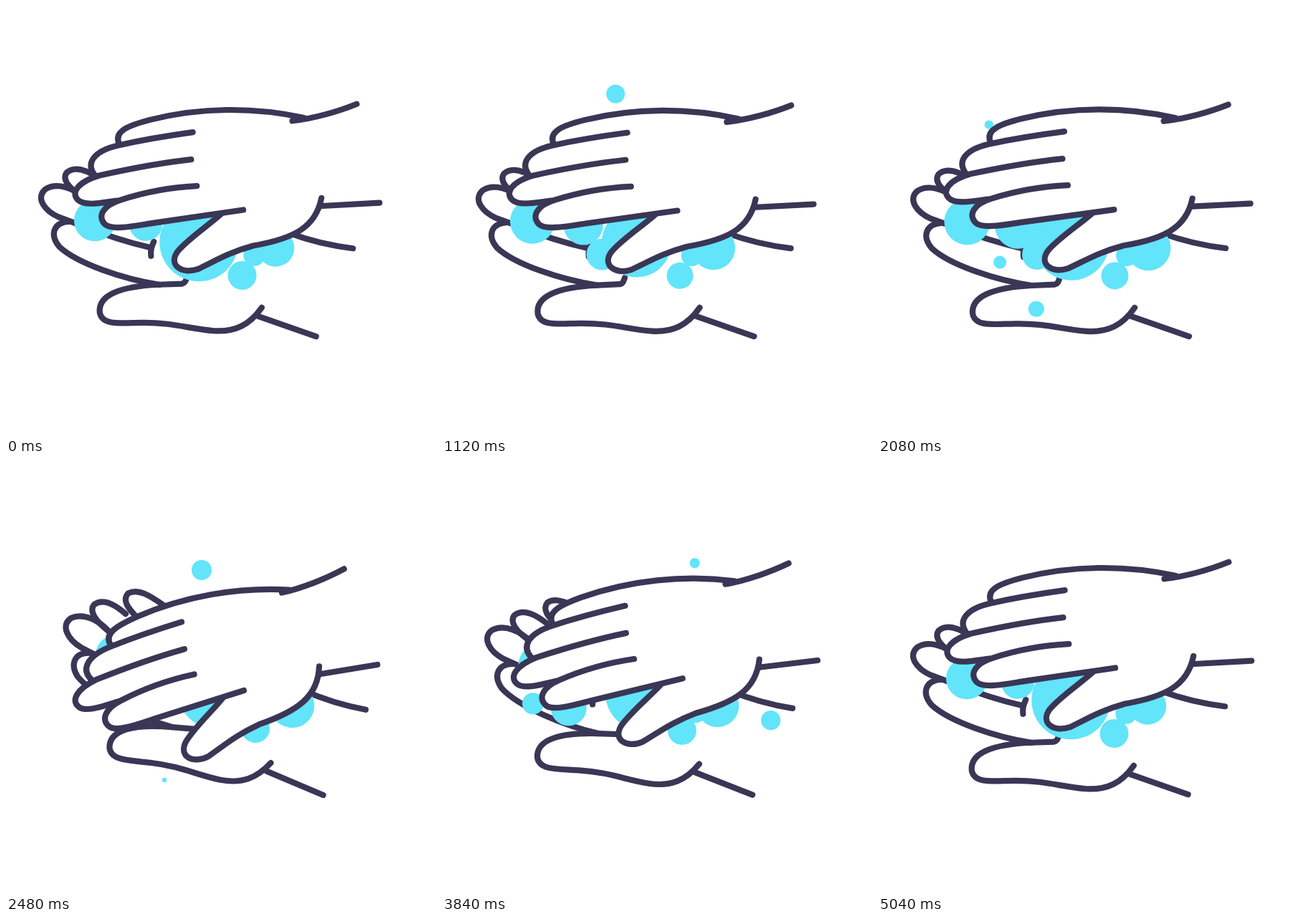
These frames come from a looping animation (600 by 600 pixels, 5.08 s). An HTML page with a canvas:

```html
<!DOCTYPE html>
<html lang="en">
<head>
<meta charset="utf-8">
<title>Washing hands</title>
<style>
  html, body { margin: 0; width: 100%; height: 100%; overflow: hidden; background: #fff; }
  canvas { display: block; width: 100vmin; height: 100vmin; }
</style>
</head>
<body>
<canvas id="stage" width="600" height="600"></canvas>
<script>
const ctx = document.getElementById('stage').getContext('2d');
const LOOP = 5080, STEP = 40, RUB = 1008;
const INK = '#3a3655', FOAM = '#62e4fa';
const paths = (...list) => list.map(d => new Path2D(d));

const lowerHand = paths(
  'M181 220 C162 210 144 201 131 210 C123 221 134 231 146 241',
  'M131 239 C112 226 96 222 86 231 C79 241 90 254 112 267',
  'M112 267 C95 252 72 244 56 254 C42 266 55 284 75 293 L99 302 C114 308 150 324 201 336',
  'M90 299 C66 300 62 318 75 334 C100 358 165 380 214 388',
  'M207 328 C204 335 202 340 203 348',
  'M253 378 C251 384 250 386 246 387 L214 388 C160 390 128 402 131 427 ' +
  'C135 445 160 441 190 441 C235 441 255 450 290 453 C320 455 340 445 357 421'
);
const lowerArm = paths('M352 433 L433 461', 'M395 317 C425 328 450 334 484 338');

const upperFill = new Path2D(
  'M157 193 C150 176 170 168 200 160 C270 142 345 141 415 156 L440 268 ' +
  'C432 310 400 325 345 335 C310 345 295 355 268 368 C245 376 226 362 240 343 ' +
  'C255 325 285 305 300 291 L205 304 C180 308 148 315 138 306 C127 295 135 280 155 274 ' +
  'C140 278 110 282 100 272 C90 262 100 247 126 238 C112 232 115 205 157 193Z'
);
const upperHand = paths(
  'M157 193 C150 176 170 168 200 160 C270 142 345 141 415 156',
  'M260 177 C225 182 190 188 155 196 C122 204 110 221 124 238',
  'M258 215 C215 220 165 230 130 238 C100 247 90 262 100 272 C110 282 138 275 155 273',
  'M266 252 C230 254 190 262 160 272 C135 280 127 295 138 306 C148 315 180 308 205 304 L331 285',
  'M300 291 C285 305 255 325 240 343 C226 362 245 376 268 368 C295 355 310 345 345 335 C400 325 432 310 440 268'
);
const upperArm = paths('M400 160 C430 157 465 147 490 137', 'M441 279 L521 275');

// Foam carried by the lower hand: position and radius at each key time
const foamTimes = [0, 520, 1680, 2480, 3040, 3840, 5040];
const foam = [
  { x: 125, y: 298, r: [29, 27, 35, 29, 31, 29, 29] },
  { x: 196, y: 304, r: [23, 25, 30, 35, 45, 32, 23] },
  { x: 222, y: 345, r: [0, 0, 42, 0, 0, 0, 0] },
  { x: 170, y: 355, r: [0, 0, 0, 18, 26, 25, 0] },
  { x: 270, y: 329, r: [55, 47, 50, 55, 63, 50, 55] },
  { x: 347, y: 348, r: [15, 15, 15, 15, 23, 16, 15] },
  { x: 377, y: 338, r: [26, 29, 32, 31, 33, 30, 26] },
  { x: 330, y: 376, r: [20, 19, 18, 20, 21, 20, 20] }
];

// Loose bubbles: life span, start point, end point, radius
const bubbles = [
  { life: [300, 1780], from: [259, 198], to: [238, 104], r: 13 },
  { life: [1200, 2200], from: [140, 213], to: [155, 165], r: 18 },
  { life: [1450, 2600], from: [220, 348], to: [221, 442], r: 11 },
  { life: [2100, 2900], from: [265, 169], to: [276, 140], r: 14 },
  { life: [2950, 4000], from: [340, 190], to: [353, 137], r: 16 },
  { life: [2960, 4100], from: [344, 387], to: [465, 356], r: 21 },
  { life: [3400, 4500], from: [150, 310], to: [114, 348], r: 15 }
];

const mix = (a, b, k) => a + (b - a) * k;
const wave = (t, peak) => 0.5 + 0.5 * Math.cos(2 * Math.PI * (t / RUB - peak));

function keyed(values, t) {
  let i = 0;
  while (i < foamTimes.length - 2 && t >= foamTimes[i + 1]) i++;
  const k = (t - foamTimes[i]) / (foamTimes[i + 1] - foamTimes[i]);
  return mix(values[i], values[i + 1], k * k * (3 - 2 * k));
}

function dot(x, y, r) {
  if (r <= 0) return;
  ctx.beginPath();
  ctx.arc(x, y, r, 0, 2 * Math.PI);
  ctx.fill();
}

// Runs draw with the pivot moved by (dx, dy) and turned by the given degrees
function posed(px, py, dx, dy, degrees, draw) {
  ctx.save();
  ctx.translate(px + dx, py + dy);
  ctx.rotate(degrees * Math.PI / 180);
  ctx.translate(-px, -py);
  draw();
  ctx.restore();
}

const strokeAll = list => list.forEach(p => ctx.stroke(p));

function drawBubble({ life, from, to, r }, t) {
  const u = (t - life[0]) / (life[1] - life[0]);
  if (u <= 0 || u >= 1) return;
  const k = 1 - (1 - u) ** 2;
  const size = Math.min(1, u / 0.15, (1 - u) / 0.35);
  dot(mix(from[0], to[0], k), mix(from[1], to[1], k), r * size);
}

function render(t) {
  const turn = wave(t, 0.57), shift = wave(t, 0.45);
  ctx.fillStyle = '#fff';
  ctx.fillRect(0, 0, 600, 600);
  ctx.strokeStyle = INK;
  ctx.lineWidth = 8.2;
  ctx.lineCap = ctx.lineJoin = 'round';

  const lower = (degrees, draw) =>
    posed(357, 421, 13 * shift - 0.5, -4.5 * turn, degrees, draw);
  const upper = (degrees, draw) =>
    posed(440, 268, 9 * turn - 11 * shift, 6.5 * turn + 9 * shift - 0.5, degrees, draw);

  lower(4.4 * turn, () => strokeAll(lowerArm));
  lower(8.7 * turn - 0.8, () => {
    strokeAll(lowerHand);
    ctx.fillStyle = FOAM;
    foam.forEach(f => dot(f.x, f.y, keyed(f.r, t)));
  });

  ctx.fillStyle = FOAM;
  bubbles.forEach(b => drawBubble(b, t));

  upper(0.8 - 11 * turn, () => {
    ctx.fillStyle = '#fff';
    ctx.fill(upperFill);
    strokeAll(upperHand);
  });
  upper(-7.4 * turn, () => strokeAll(upperArm));
}

function tick() {
  const t = performance.now() % LOOP;
  render(Math.floor(t / STEP) * STEP);
  requestAnimationFrame(tick);
}
tick();
</script>
</body>
</html>
```
